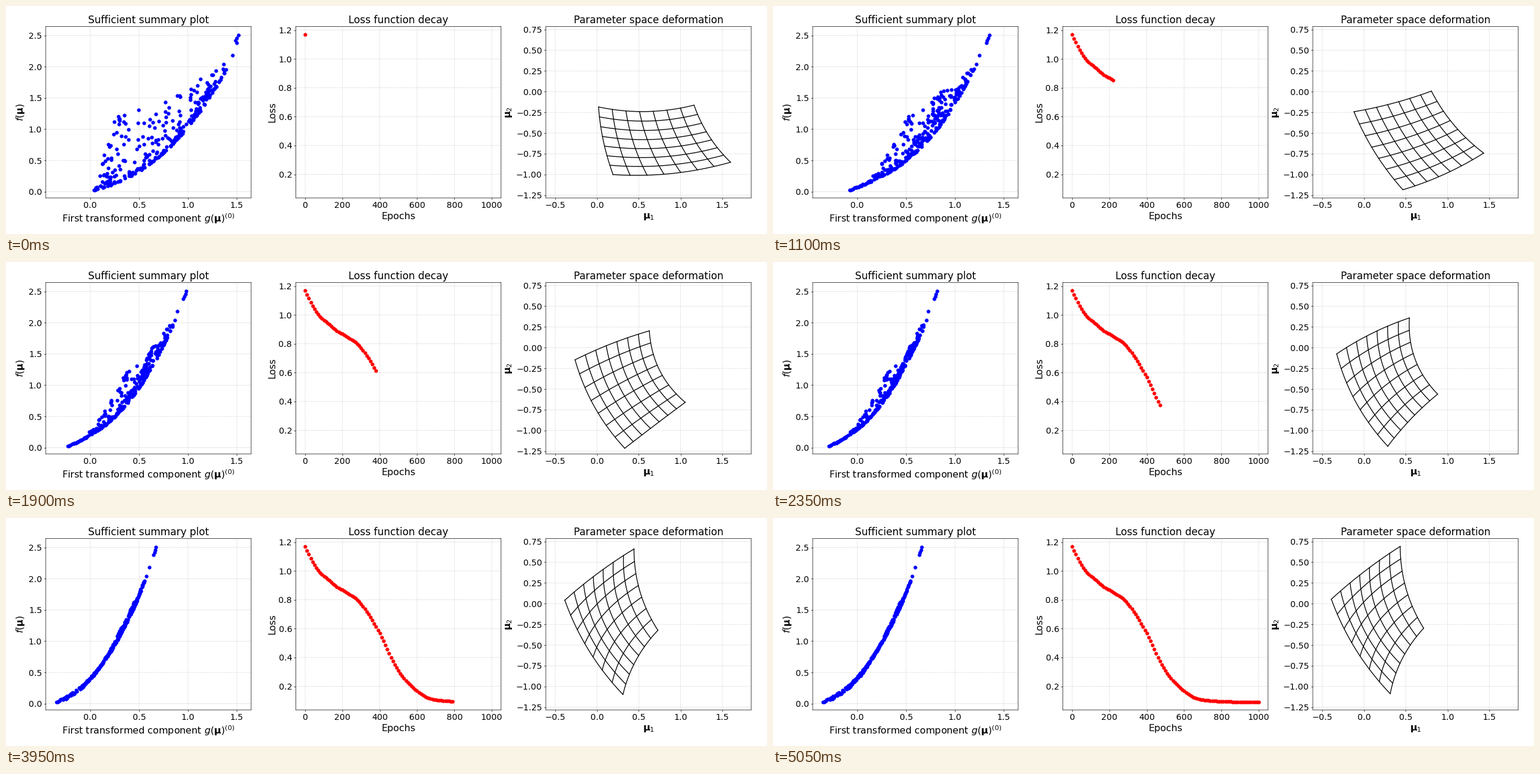
Write a matplotlib script that moves like this. It is 1280x384 px and loops after 6050 ms.

```python
import numpy as np
import matplotlib.pyplot as plt
from matplotlib.animation import FuncAnimation

STEPS, HOLD = 101, 20
SETTLE, RELAX = 47, 15  # step where the map starts to settle, decay in steps

# Key poses of the deformed unit square: corners (0,0), (0,1), (1,0), (1,1)
# as mu1 + i mu2, the bows of its edges y=0, y=1, x=0, x=1, and the centre shift.
POSE_TIMES = np.array([0, 14, SETTLE, SETTLE + RELAX - 0.5])
POSES = np.array([
    [.018 - .185j, 1.161 - .163j, .192 - 1.001j, 1.598 - .852j,
     -.029, -.048, -.066, -.061, 0],
    [-.060 - .249j, .920 - .067j, .437 - 1.136j, 1.548 - .778j,
     -.037, -.042, -.042, -.050, 0],
    [-.327 - .075j, .543 + .359j, .284 - 1.190j, .881 - .561j,
     -.079, -.108, .033, .026, -.02],
    [-.391 + .053j, .433 + .689j, .313 - 1.087j, .714 - .298j,
     -.070, -.072, .023, .062, -.05],
])

LOSS_KNOTS = np.array([0, 50, 150, 300, 400, 480, 600, 680, 720, 1000])
LOSS_VALUES = np.array([1.168, 1.041, .912, .77, .567, .35, .168, .111, .104, .09])


def hermite(t, ts, vs):
    """Smooth curve through the knots (ts, vs)."""
    slopes = np.gradient(vs, ts, axis=0)
    k = min(np.searchsorted(ts, t, side="right") - 1, len(ts) - 2)
    h = ts[k + 1] - ts[k]
    s = (t - ts[k]) / h
    return ((1 + 2 * s) * (1 - s) ** 2 * vs[k] + s * s * (3 - 2 * s) * vs[k + 1]
            + h * s * (1 - s) * ((1 - s) * slopes[k] - s * slopes[k + 1]))


def pose_time(step):
    """Linear at first, then an exponential approach to rest."""
    if step <= SETTLE:
        return step
    return SETTLE + RELAX * (1 - np.exp((SETTLE - step) / RELAX))


def bow(s, start, end, height):
    """Sideways offset of a bowed edge from its chord."""
    return 4 * s * (1 - s) * height * 1j * (end - start) / abs(end - start)


def transform(step, x, y):
    """Map points of the unit square with the network of this step."""
    o, a, b, c, y0, y1, x0, x1, shift = hermite(pose_time(step), POSE_TIMES, POSES)
    flat = (1 - x) * ((1 - y) * o + y * a) + x * ((1 - y) * b + y * c)
    bent = ((1 - y) * bow(x, o, b, y0) + y * bow(x, a, c, y1)
            + (1 - x) * bow(y, o, a, x0) + x * bow(y, b, c, x1))
    point = flat + bent + 16 * x * (1 - x) * y * (1 - y) * shift
    return point.real, point.imag


sx, sy = np.random.RandomState(42).uniform(size=(2, 300))
f_values = sx ** 3 + sy ** 3 + 0.2 * sx + 0.6 * sy

epochs = np.arange(STEPS) * 10
losses = np.array([hermite(e, LOSS_KNOTS, LOSS_VALUES) for e in epochs])

plt.rcParams.update({"font.size": 16, "path.snap": False})
fig, axes = plt.subplots(1, 3, figsize=(20, 6), dpi=64)
summary, decay, space = axes


def label(ax, title, xlabel, ylabel):
    ax.set_title(title)
    ax.set_xlabel(xlabel, fontsize=18)
    ax.set_ylabel(ylabel, fontsize=18)
    ax.grid(linestyle="dotted")


label(summary, "Sufficient summary plot",
      r"First transformed component $g(\mathbf{\mu})^{(0)}$",
      r"$f(\mathbf{\mu})$")
label(decay, "Loss function decay", "Epochs", "Loss")
label(space, "Parameter space deformation", r"$\mathbf{\mu}_1$",
      r"$\mathbf{\mu}_2$")

# The layout is fixed while the axes still have their unit limits.
fig.tight_layout()
summary.set(xlim=(-0.456, 1.646), ylim=(-0.1, 2.642))
decay.set(xlim=(-50, 1050), ylim=(0.037, 1.224))
space.set(xlim=(-0.613, 1.844), ylim=(-1.282, 0.785),
          xticks=np.arange(-0.5, 1.6, 0.5), yticks=np.arange(-1.25, 0.8, 0.25))

cloud, = summary.plot([], [], "bo")
curve, = decay.plot([], [], "ro")

along = np.linspace(0, 1, 29)
mesh = []
for level in np.linspace(0, 1, 8):
    fixed = np.full_like(along, level)
    for x, y in ((fixed, along), (along, fixed)):
        mesh.append((space.plot([], [], "k")[0], x, y))


def draw(frame):
    step = min(frame, STEPS - 1)
    cloud.set_data(transform(step, sx, sy)[0], f_values)
    curve.set_data(epochs[:step + 1], losses[:step + 1])
    for line, x, y in mesh:
        line.set_data(*transform(step, x, y))
    return [cloud, curve] + [line for line, _, _ in mesh]


anim = FuncAnimation(fig, draw, frames=STEPS + HOLD, interval=50,
                     repeat=True, repeat_delay=0)
plt.show()
```
